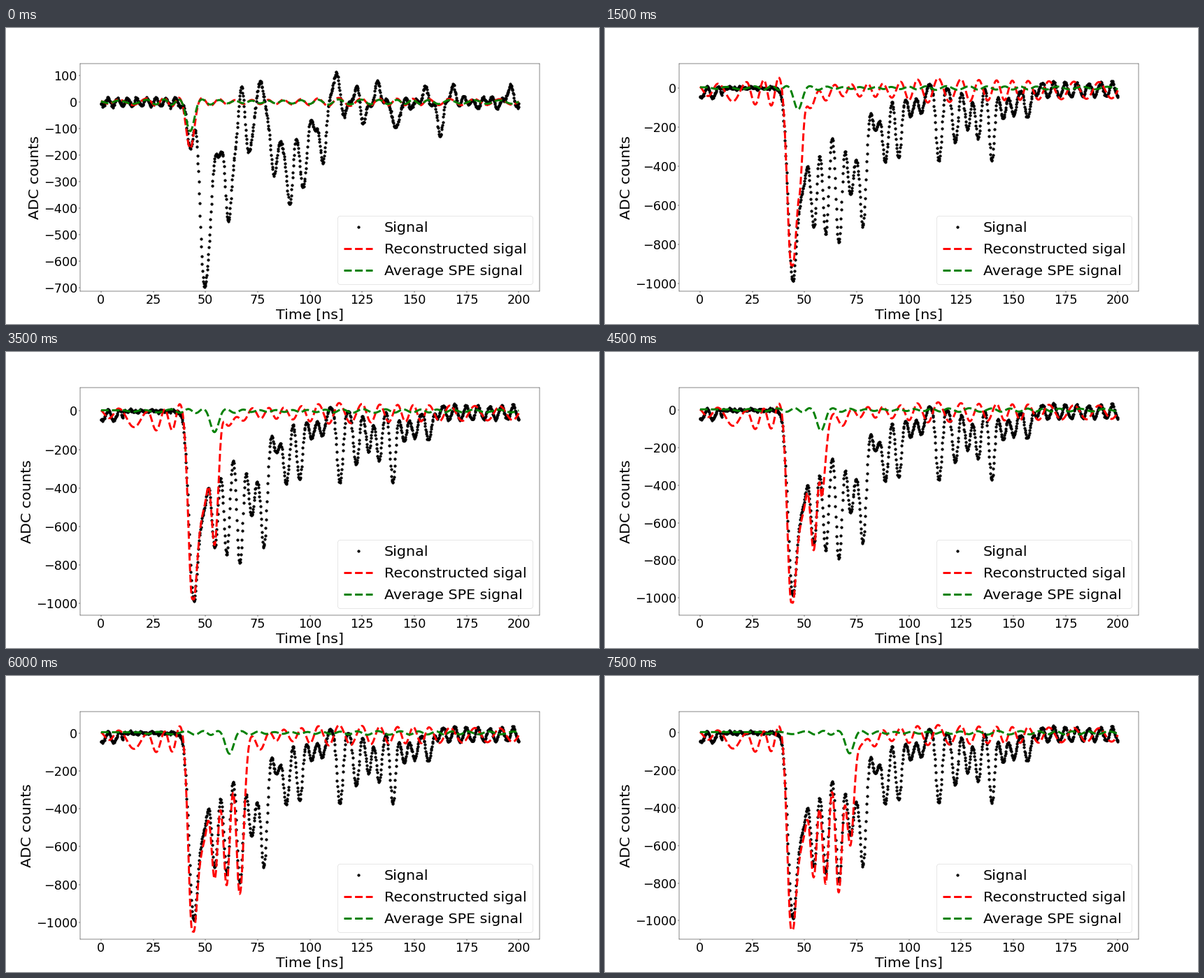
Recreate the animation shown at these times as a matplotlib script. Size 848 by 424 pixels, loop 8000 ms.

```python
import numpy as np
import matplotlib.pyplot as plt
from matplotlib.animation import FuncAnimation

FRAMES, INTERVAL = 16, 500
t = np.arange(0, 200.1, 0.2)
noise = np.random.default_rng(4).normal(0, 3, t.size)


def bell(x, sigma):
    return np.exp(-(x / sigma) ** 2 / 2)


def wave(x, crest, period):
    return np.cos(2 * np.pi * (x - crest) / period)


def window(x, a, b, soft):
    return (np.tanh((x - a) / soft) - np.tanh((x - b) / soft)) / 2


# ---- measured signals: a baseline plus pulses reaching given (time, level) ----
PULSES_A = [(42.8, -175), (49, -677), (52, -500), (56.3, -205), (60.8, -448),
            (64.2, -180), (67.2, 58), (69.7, -152), (72.2, -130), (75.3, 62),
            (82.5, -270), (86.6, -165), (90.4, -380), (95.9, -298), (98, -250),
            (102.3, -105), (106, -228), (112.3, 106), (116, -50), (122.3, 60),
            (125.2, -80), (132.3, 78), (141.3, -95), (155.5, 58), (162.5, -128),
            (168.2, 62), (195.5, 58)]
PULSES_B = [(42, -590), (44.2, -988), (47, -670), (49.8, -490), (54.4, -710),
            (60.1, -745), (66.4, -790), (71.8, -540), (74.8, -368), (78, -702),
            (83.8, -215), (88.6, -375), (95, -358), (100.8, -145), (105.8, -128),
            (114.3, -372), (122, -275), (128, -212), (133, -260), (139.6, -370),
            (145, -155), (150, -135), (156.7, -150)]


def base_a(x):
    return 14 * wave(x, 3.3, 4.6) + 10 * window(x, 110, 220, 2) * wave(x, 185, 10.4)


def base_b(x):
    start = window(x, -9, 10.6, 0.2) * (-22 + 28 * wave(x, 3.3, 5.3))
    middle = 25 * window(x, 92, 146, 3)
    tail = window(x, 160, 220, 2) * (-8 + 35 * wave(x, 174.8, 5.6))
    return start + middle + tail + 6 * np.sin(1.9 * x) * np.sin(0.6 * x)


def waveform(base, pulses):
    """Solve the pulse heights so that the sum meets every level."""
    at, level = np.array(pulses).T
    sigma = np.interp(at, [44, 140], [1.75, 1.35])
    height = np.linalg.solve(bell(at[:, None] - at, sigma), level - base(at))
    return base(t) + bell(t[:, None] - at, sigma) @ height


clean_a, clean_b = waveform(base_a, PULSES_A), waveform(base_b, PULSES_B)

# ---- electronic ringing around a pulse at 43 ns ----
CRESTS = [-1, 8.5, 22.3, 30.5, 37.7, 48.5, 57, 64.5, 72.5, 80.4, 87.5, 96, 104,
          114, 125, 133.5, 142, 149.5, 157, 167, 179, 191, 203]


def ringing(x):
    phase = np.interp(x, CRESTS, np.arange(len(CRESTS)))
    size = np.interp(x, [0, 20, 40, 52, 62, 90, 110, 135, 200],
                     [20, 45, 65, 55, 25, 30, 55, 45, 35])
    return size * np.cos(2 * np.pi * phase)


def spe(at, height):
    """Single photoelectron response."""
    g = bell(t - at, 1.8)
    return height * ((1 - g) * ringing(t - at + 43) / 600 - g)


# ---- progress of the reconstruction ----
STEPS = [1, 4, 7, 10, 12, 15]


def keyed(n, values):
    return np.interp(n, STEPS, values)


def front(n):
    return keyed(n, [43, 49.3, 54.3, 60, 66.5, 71.9])


def latest(n):
    return keyed(n, [43, 48.9, 54.3, 59.7, 61.5, 71.6])


def reconstruction(n):
    end = front(n)
    drift = -12 - np.interp(n, [1, 7], [0, 38]) * window(t, 12, 36, 4)
    rest = (np.interp(n, [1, 4], [1.5, 1]) * ringing(t) + drift
            - 50 * bell(t - end - 9, 3))
    begin = min(43.7, end)
    w = bell(t - np.clip(t, begin, end), 1.8)
    core = np.interp(np.clip(t, 44.2, max(end, 44.2)), t, clean_b)
    core += np.interp(n, [4, 10], [80, -60])
    return w * core + (1 - w) * rest


fig, ax = plt.subplots(figsize=(20, 10), dpi=42.4)
dots, = ax.plot(t, clean_a, "k.", ms=12, label="Signal")
red, = ax.plot(t, 0 * t, "r--", lw=5, label="Reconstructed sigal")
green, = ax.plot(t, 0 * t, "g--", lw=5, label="Average SPE signal")
ax.set_xlim(-10, 210)
ax.set_xlabel("Time [ns]", fontsize=35)
ax.set_ylabel("ADC counts", fontsize=35)
ax.tick_params(labelsize=30)
ax.legend(fontsize=35, loc="lower right", labelspacing=0.58, borderpad=0.42)


def update(n):
    if n == 0:
        dots.set_ydata(clean_a + noise)
        red.set_ydata(spe(42.7, 175))
        green.set_ydata(spe(42.7, 110))
        ax.set_ylim(-714, 145)
    else:
        dots.set_ydata(clean_b + noise)
        red.set_ydata(reconstruction(n))
        green.set_ydata(spe(latest(n), 110))
        ax.set_ylim(keyed(n, [-1044, -1040, -1063, -1109, -1090, -1100]),
                    keyed(n, [154, 111, 122, 119, 113, 113]))
    return dots, red, green


anim = FuncAnimation(fig, update, frames=FRAMES, interval=INTERVAL,
                     repeat=True, repeat_delay=0, blit=False)
plt.show()
```
